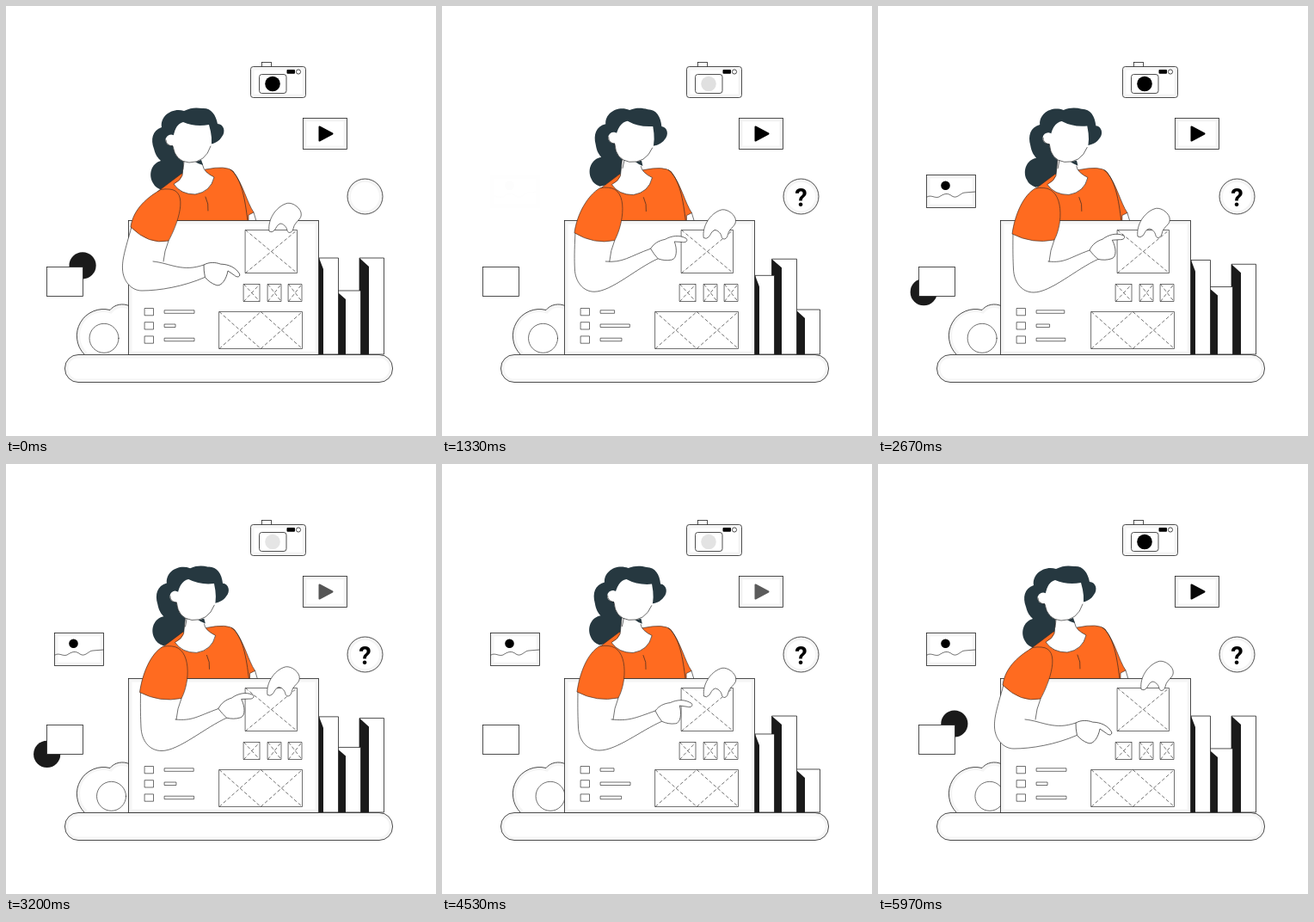
Animation of 500 by 500 pixels, one loop 6010 ms. Source, as an HTML page:

```html
<!DOCTYPE html>
<html lang="en">
<head>
<meta charset="utf-8">
<title>Wireframe planning</title>
<style>
html, body { margin: 0; width: 100%; height: 100%; overflow: hidden; background: #fff; }
svg { display: block; width: 100%; height: 100%; }
.line { fill: none; stroke: #222; stroke-width: .65; stroke-linejoin: round; stroke-linecap: round; }
.box { fill: #fff; stroke: #222; stroke-width: .8; }
.soft { fill: none; stroke: #000; stroke-opacity: .04; stroke-width: 4; }
.skin { fill: #fff; stroke: #222; stroke-width: .65; stroke-linejoin: round; }
.bare { fill: #fff; }
.shirt { fill: #ff6b20; stroke: #3a2a22; stroke-width: .65; }
.hair { fill: #263840; }
.dash { fill: none; stroke: #222; stroke-width: .65; stroke-dasharray: 4 2.5; }
.ink { fill: #1a1a1a; }
.black { fill: #000; }
text { font: 700 29px Roboto, Arial, sans-serif; text-anchor: middle; }
</style>
</head>
<body>
<svg viewBox="0 0 500 500">
  <g id="camera">
    <rect class="box" x="297.5" y="65.5" width="11" height="6"/>
    <rect class="box" x="284.5" y="70.5" width="64" height="36" rx="3"/>
    <rect class="soft" x="286.5" y="72.5" width="60" height="32" rx="2"/>
    <rect class="box" x="294.5" y="79.5" width="31.5" height="22" rx="3"/>
    <circle id="lens" class="black" cx="310" cy="90.5" r="8.8"/>
    <rect class="black" x="326.5" y="74" width="9.5" height="4.7" rx="1"/>
    <circle class="box" cx="340" cy="76.5" r="2.6"/>
  </g>

  <rect class="box" x="345.5" y="130.5" width="51" height="36"/>
  <rect class="soft" x="347.5" y="132.5" width="47" height="32"/>
  <path id="play" d="M364.5 140.5 L379.5 148.5 L364.5 156.5 Z" stroke="#000" stroke-width="2" stroke-linejoin="round"/>

  <circle class="box" cx="417.5" cy="221.5" r="20.5"/>
  <circle class="soft" cx="417.5" cy="221.5" r="18.5"/>
  <text id="question" x="417.5" y="232.6">?</text>

  <g id="picture">
    <rect class="box" x="56.5" y="196.5" width="57" height="38"/>
    <rect class="soft" x="58.5" y="198.5" width="53" height="34"/>
    <circle class="black" cx="78.5" cy="208.7" r="5.3"/>
    <path class="line" d="M57 222 C62 219 66 224 71 222 C77 218 81 217 86 221 C92 225 96 217 101 217 C105 217 109 216 113 216"/>
  </g>

  <circle id="dot" class="ink" r="15.6"/>
  <rect class="box" x="47.5" y="303.5" width="42" height="34"/>

  <path class="box" d="M91 405 A31 31 0 0 1 121 353.5 C126 347 136 345 144 349 V405"/>
  <path class="soft" d="M93 404 A29 29 0 0 1 122 355.5 C127 349 136 347 143 351"/>
  <circle id="ball" class="line" cy="386.3" r="17"/>

  <g id="books"></g>

  <path id="hair" class="hair" d="M207 122 C215 118 221 118 228 119 C238 118 244 126 246 137 C253 137 256 146 251 152
    C248 157 243 160 236 161 L224 180 L206 206 L182 214 Q174 212 171 206 C165 196 169 183 180 180
    C177 177 174 174 172 166 C168 155 170 145 181 141 C179 128 193 118 207 122 Z"/>
  <g id="torso">
    <path class="shirt" d="M176 216 L204 195 L232 190 Q256 185 264 192 C276 208 280 228 288 240 L282 243 V256 H190 Z"/>
    <path class="line" d="M261 190 C274 200 278 225 281 250 M232 222 Q236 230 235 238 M288 240 L291 250"/>
    <path class="skin" d="M207 178 L205 197 Q203 203 195 207 Q203 219 220 219 Q238 216 242 199 Q230 193 229 186 L226 178 Z"/>
  </g>
  <g id="head">
    <path class="bare" d="M207 172 H227 L228 185 L206 193 Z"/>
    <path class="hair" d="M218 180 L227 179 L229 185 Q224 184 218 180 Z"/>
    <circle class="bare" cx="192" cy="156" r="6.5"/>
    <path class="bare" d="M194 158 Q195 138 206 135 Q220 141 236 138 Q241 155 238 165 Q232 182 213 182 Q197 181 194 163 Z"/>
    <path class="line" d="M238 163 Q232 182 213 182 Q197 181 194 163 Q186 162 186 156 M207 181 L206 190"/>
  </g>

  <rect class="box" x="142.5" y="249.5" width="221" height="156"/>
  <rect class="soft" x="144.5" y="251.5" width="217" height="152"/>
  <g id="wireframe"></g>

  <path id="arm-fill" class="bare"/>
  <path id="arm" class="line"/>
  <path id="sleeve" class="shirt"/>
  <path id="hand" class="skin" d="M0 0 C4 -6 10 -9 17 -10 C25 -14 34 -15 42 -10 C44 -7 41 -5 37 -6 L28 -7
    C31 2 30 13 24 14 C18 15 13 14 8 12 Q3 6 0 0 Z"/>
  <path id="grip" class="skin" d="M306 262 C304 248 314 234 325 230 C331 227 341 233 343 240 C345 249 336 249 334 259
    C333 264 328 265 327 261 C326 256 322 253 319 253 C315 254 314 259 312 261 Q309 264 306 262 Z"/>

  <rect class="box" x="68.5" y="405.5" width="381" height="32" rx="15.5"/>
  <rect class="soft" x="70.5" y="407.5" width="377" height="28" rx="13.5"/>
</svg>
<script>
const LOOP = 6010;
const byId = id => document.getElementById(id);
const clamp = v => Math.min(1, Math.max(0, v));
const ease = u => (1 - Math.cos(Math.PI * clamp(u))) / 2;
const wave = (t, period) => Math.cos(2 * Math.PI * t / period);

function add(parent, tag, attrs) {
  const node = document.createElementNS('http://www.w3.org/2000/svg', tag);
  set(node, attrs);
  byId(parent).append(node);
  return node;
}
function set(node, attrs) {
  for (const key in attrs) node.setAttribute(key, attrs[key]);
}

// Placeholder image: a frame crossed by dashed diagonals.
function placeholder(x, y, w, h, crosses = 1) {
  add('wireframe', 'rect', { class: 'line', x, y, width: w, height: h });
  const step = w / crosses;
  for (let i = 0; i < crosses; i++) {
    const left = x + i * step;
    add('wireframe', 'path', { class: 'dash', d: `M${left} ${y} l${step} ${h} M${left} ${y + h} l${step} ${-h}` });
  }
}
placeholder(278.5, 260.5, 60, 50);
[[276.5, 18.5], [304.5, 15.5], [328.5, 15.5]].forEach(([x, w]) => placeholder(x, 323.5, w, 20));
placeholder(248, 355.5, 96.5, 43, 2);

// Middle value and swing of each right edge.
const bars = [[209.5, 9.5], [208, -11], [213.8, 5.2]].map(([mid, swing], i) => {
  const y = 351.5 + i * 16.2;
  add('wireframe', 'rect', { class: 'line', x: 161.5, y, width: 10, height: 8.3 });
  return { mid, swing, node: add('wireframe', 'rect', { class: 'line', x: 184.5, y: y + 2.3, height: 3.5 }) };
});

// The back book is drawn first.
const books = [
  { x: 411, spine: 422, right: 439.5, slant: 10, mid: 324, swing: -31 },
  { x: 383.5, spine: 395, right: 412.5, slant: 10, mid: 312, swing: 19 },
  { x: 364, spine: 369, right: 386.5, slant: 13, mid: 303.5, swing: -10.5 }
].map(book => ({
  ...book,
  cover: add('books', 'path', { class: 'box' }),
  back: add('books', 'path', { class: 'ink' })
}));

// Each pose: time, then lean, sleeve hem A and B, arm's left edge, elbow,
// crease, wrist, hand turn and grip offset.
const fields = ['lean', 'ax', 'ay', 'bx', 'by', 'left', 'ex', 'ey', 'crease', 'wx', 'wy', 'turn', 'gx', 'gy'];
const rest = [0, 145, 257, 189, 273, 135, 158, 331, 171, 230, 301, 28, 0, 0];
const poses = [
  [0, rest],
  [830, [8.5, 152, 261, 198, 272, 150, 172, 330, 182, 236, 275, -8, -4, 7]],
  [1770, [4, 155.5, 266, 203, 273, 157, 181, 334, 197, 248, 288, 2, 0, 8]],
  [2670, [4.7, 156, 265, 205, 272, 157, 181, 333, 198, 246, 284, -10, -4, 6]],
  [3730, [3, 155, 266, 203, 273, 156, 181, 334, 196, 248, 285, -7, 0, 7]],
  [4530, [5.2, 157, 265, 205, 272, 158, 183, 333, 197, 248, 287, 2, -1.5, 8]],
  [5970, rest],
  [LOOP, rest]
];

function poseAt(t) {
  const next = poses.findIndex(pose => pose[0] > t);
  const [t0, from] = poses[next - 1], [t1, to] = poses[next];
  const u = ease((t - t0) / (t1 - t0));
  return Object.fromEntries(fields.map((name, i) => [name, from[i] + (to[i] - from[i]) * u]));
}

function drawWoman(t) {
  const p = poseAt(t);
  const headMove = `translate(0 ${-p.lean * .25}) rotate(${p.lean} 208 228)`;
  set(byId('head'), { transform: headMove });
  set(byId('hair'), { transform: headMove });
  set(byId('torso'), { transform: `translate(${p.lean * .4} ${p.lean * .1})` });

  const sx = 180 + p.lean * .6, sy = 213.5 - p.lean * .3;
  set(byId('sleeve'), { d: `M${sx} ${sy} C${sx - 14} ${sy + 8} ${p.ax + 3} ${p.ay - 22} ${p.ax} ${p.ay}
    Q${(p.ax + p.bx) / 2 - 1} ${p.by + 5} ${p.bx} ${p.by}
    C${p.bx + 10} ${p.by - 18} ${sx + 34} ${sy + 1} ${sx + 10} ${sy - .5} Q${sx + 5} ${sy - 1} ${sx} ${sy} Z` });

  const a = p.turn * Math.PI / 180;
  const lowX = p.wx + 8 * Math.cos(a) - 12 * Math.sin(a);
  const lowY = p.wy + 8 * Math.sin(a) + 12 * Math.cos(a);
  const outer = `M${p.ax + 1} ${p.ay} C${p.ax + (p.left - p.ax) * .7} 285 ${p.left} 295 ${p.left + .5} 306
    C${p.left + 1} ${p.ey - 12} ${p.left + 10} ${p.ey} ${p.ex} ${p.ey}
    C${p.ex + 20} ${p.ey} ${lowX - 25} ${lowY + 11} ${lowX} ${lowY}`;
  const bend = `${p.wx - 25} ${p.wy + 9} ${p.crease + 20} 299`;
  set(byId('arm-fill'), { d: `${outer} L${p.wx} ${p.wy} C${bend} ${p.bx - 6} 297 L${p.bx} ${p.by} Z` });
  set(byId('arm'), { d: `${outer} M${p.wx} ${p.wy} C${bend} ${p.crease} 297
    M${p.bx} ${p.by} Q${p.bx - 5} ${p.by + 12} ${p.bx - 6} 297` });
  set(byId('hand'), { transform: `translate(${p.wx} ${p.wy}) rotate(${p.turn})` });
  set(byId('grip'), { transform: `translate(${p.gx} ${p.gy})` });
}

// Smooth bump of height 1 around a moment.
const bump = (t, center, half) => ease(1 - Math.abs(t - center) / half);

function draw(t) {
  const swing = wave(t, LOOP / 2);
  for (const b of bars) set(b.node, { width: b.mid + b.swing * swing - 184.5 });
  for (const b of books) {
    const top = b.mid + b.swing * swing;
    set(b.cover, { d: `M${b.x} 405 V${top} H${b.right} V405 Z` });
    set(b.back, { d: `M${b.x} 405 V${top} L${b.spine} ${top + b.slant} V405 Z` });
  }

  const shift = bump(t, 30, 1000) + bump(t, LOOP + 30, 1000) - bump(t, 3050, 1000);
  set(byId('dot'), { cx: 67.8 + 21.3 * shift, cy: 320.1 - 18.3 * shift });
  set(byId('ball'), { cx: 114 + 16 * t / LOOP });

  set(byId('play'), { opacity: .54 + .46 * wave(t, LOOP / 9) });
  const dim = [1285, 3185, 4500].reduce((sum, at) => sum + bump(t, at, 450), 0);
  set(byId('lens'), { opacity: 1 - .9 * dim });
  set(byId('question'), { opacity: ease((t - 300) / 350) });
  set(byId('picture'), { opacity: ease((t - 1320) / 350) });
  drawWoman(t);
}

function tick() {
  draw(performance.now() % LOOP);
  requestAnimationFrame(tick);
}
tick();
</script>
</body>
</html>
```
